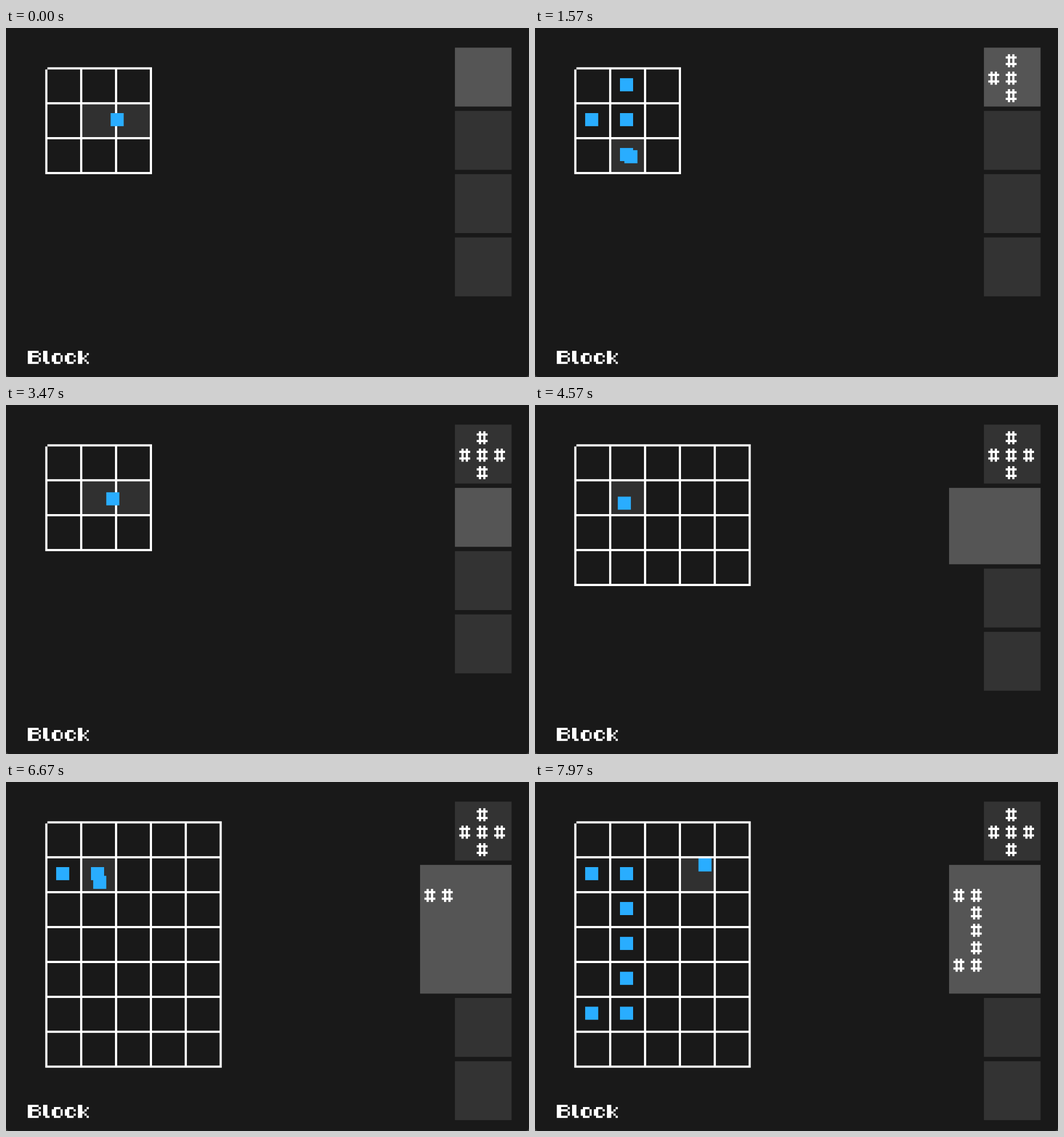
Animation, 917 px wide and 611 px high, one loop 8 s. Source, as an HTML page with a canvas:

```html
<!DOCTYPE html>
<html lang="en">
<head>
<meta charset="utf-8">
<title>Block</title>
<style>
  html, body { margin: 0; width: 100%; height: 100%; overflow: hidden; background: #191919; }
  canvas { display: block; width: 100vw; height: 100vh; }
  p { position: absolute; left: 38px; top: 562px; margin: 0; color: transparent;
      font: 26px "DejaVu Sans Mono", monospace; }
</style>
</head>
<body>
<canvas id="stage" width="960" height="640"></canvas>
<p>Block</p>
<script>
const LOOP = 8000, LAST = 239;
const W = 240, H = 160, ORIGIN = 18, CELL = 16, SIZE = 6;
const BLUE = '#29adff', WHITE = '#fff', DARK = '#333', LIT = '#555', HOVER = '#303030';
const ctx = document.getElementById('stage').getContext('2d');
ctx.scale(4, 4);

// Pointer stops: arrival tick (1/30 s), x, y; each glide takes at most GLIDE ticks
const GLIDE = 9;
const STOPS = [
  [0, 48, 39], [7, 18, 40], [17, 38, 40], [25, 38, 37], [28, 38, 22], [41, 39, 58],
  [55, 53, 37], [78, 53, 38], [109, 38, 42], [189, 21, 40], [200, 40, 43],
  [205, 41, 74], [213, 41, 102], [223, 23, 101], [237, 77, 33], [239, 75, 35]
];
const STROKES = [[8, 56], [190, 223]]; // button held; one stroke per panel
const SWITCH = 88, GROW = 5, COLS_FROM = 118, ROWS_FROM = 132;

const GLYPHS = {
  '#': '.#.#. ##### .#.#. .#.#. ##### .#.#.',
  B: '#####. ##...# #####. ##...# ##...# #####.',
  l: '##. ##. ##. ##. ##. .##',
  o: '..... .###. ##..# ##..# ##..# .###.',
  c: '..... .###. ##..# ##... ##..# .###.',
  k: '##... ##..# ##.#. ###.. ##.#. ##..#'
};

const clamp = (v, lo, hi) => Math.min(hi, Math.max(lo, v));

function box(x, y, w, h, color) {
  ctx.fillStyle = color;
  ctx.fillRect(x, y, w, h);
}

function write(text, x, y) {
  for (const ch of text) {
    const rows = GLYPHS[ch].split(' ');
    rows.forEach((row, j) => [...row].forEach((dot, i) => {
      if (dot === '#') box(x + i, y + j, 1, 1, WHITE);
    }));
    x += rows[0].length + 1;
  }
}

function pointer(tick) {
  const i = Math.max(1, STOPS.findIndex(s => s[0] >= tick));
  const [t0, x0, y0] = STOPS[i - 1], [t1, x1, y1] = STOPS[i];
  const span = Math.min(GLIDE, t1 - t0);
  const k = clamp((tick - t1 + span) / span, 0, 1);
  return [Math.round(x0 + (x1 - x0) * k), Math.round(y0 + (y1 - y0) * k)];
}

// Every cell under the held pointer is painted one tick later
function painted([from, to], tick) {
  const cells = new Map();
  for (let t = from; t <= to && t < tick; t++) {
    const cell = pointer(t).map(p => Math.floor((p + SIZE / 2 - ORIGIN - 1) / CELL));
    cells.set(cell.join(), cell);
  }
  return [...cells.values()];
}

function drawGrid(cols, rows, cells, [px, py]) {
  const touches = (p, n) => {
    const start = ORIGIN + n * CELL + 1;
    return p < start + CELL - 1 && p + SIZE > start;
  };
  for (let c = 0; c < cols; c++)
    for (let r = 0; r < rows; r++)
      if (touches(px, c) && touches(py, r))
        box(ORIGIN + c * CELL + 1, ORIGIN + r * CELL + 1, CELL - 1, CELL - 1, HOVER);

  // The top left corner pixel stays open
  for (let c = 0; c <= cols; c++) box(ORIGIN + c * CELL, ORIGIN + !c, 1, rows * CELL + 1 - !c, WHITE);
  for (let r = 0; r <= rows; r++) box(ORIGIN + !r, ORIGIN + r * CELL, cols * CELL + 1 - !r, 1, WHITE);

  for (const [c, r] of cells)
    box(ORIGIN + c * CELL + 5, ORIGIN + r * CELL + 5, SIZE, SIZE, BLUE);
  box(px, py, SIZE, SIZE, BLUE);
}

function drawCorners() {
  ctx.fillStyle = '#3a3a3a';
  for (const [x, dir] of [[0, 1], [W, -1]]) {
    ctx.beginPath();
    ctx.moveTo(x, H - 1.8);
    ctx.quadraticCurveTo(x, H, x + 1.8 * dir, H);
    ctx.lineTo(x, H);
    ctx.fill();
  }
}

function draw(tick) {
  const grown = (from, max) => clamp(Math.floor((tick - from) / GROW), 0, max);
  const cols = 3 + grown(COLS_FROM, 2), rows = 3 + grown(ROWS_FROM, 4);
  const active = tick >= SWITCH ? 1 : 0;

  box(0, 0, W, H, '#191919');
  drawCorners();
  drawGrid(cols, rows, painted(STROKES[active], tick), pointer(tick));

  for (let i = 0, y = 9; i < 4; i++) {
    const w = 2 + 8 * (i === 1 ? cols : 3), h = 3 + 8 * (i === 1 ? rows : 3);
    const x = 232 - w;
    box(x, y, w, h, i === active ? LIT : DARK);
    if (STROKES[i])
      for (const [c, r] of painted(STROKES[i], tick)) write('#', x + 2 + c * 8, y + 3 + r * 8);
    y += h + 2;
  }
  write('Block', 10, 148);
}

const start = performance.now();
function loop() {
  const t = (performance.now() - start) % LOOP;
  draw(Math.min(LAST, Math.floor((t + 4) * 0.03)));
  requestAnimationFrame(loop);
}
loop();
</script>
</body>
</html>
```
